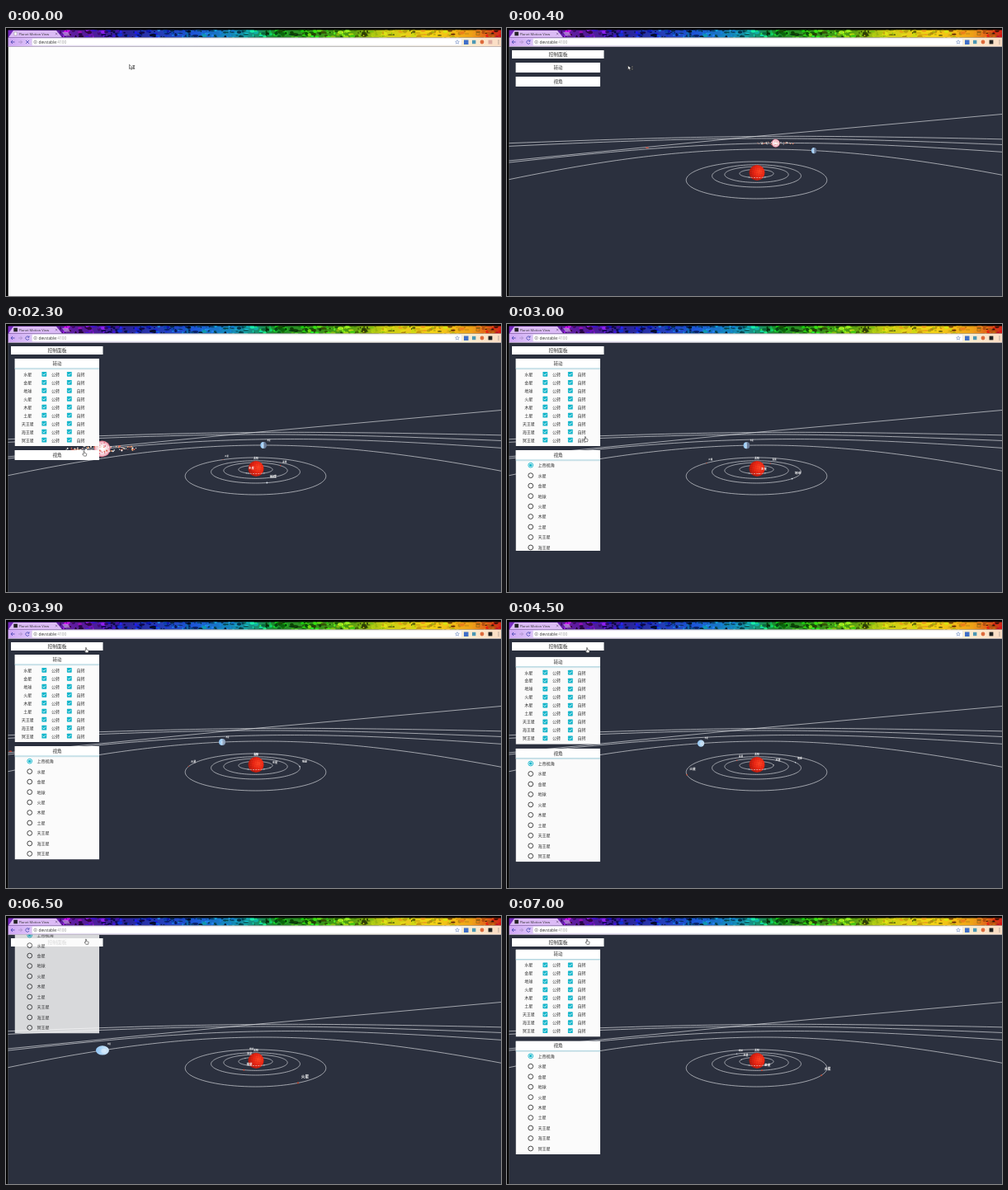
Write an HTML page that moves like this. It is 600x325 px and loops after 7.1 s.

```html
<!DOCTYPE html>
<html lang="zh">
<head>
<meta charset="utf-8">
<title>Planet Motion View</title>
<style>
html, body { margin: 0; width: 100%; height: 100%; overflow: hidden; background: #000; }
svg { display: block; width: 100vw; height: 100vh; }
text { font-family: "Noto Sans CJK SC", "Noto Sans CJK", sans-serif; fill: #333; }
.ui { font-family: "Open Sans", "Noto Sans", sans-serif; }
.tag { fill: #fff; font-weight: 700; text-anchor: middle; }
.mid { text-anchor: middle; }
.line { fill: none; stroke: #eceef0; stroke-width: .62; }
</style>
</head>
<body>
<svg id="stage" viewBox="0 0 600 325" preserveAspectRatio="none">
  <defs>
    <linearGradient id="paint">
      <stop offset="0" stop-color="#7a2cc0"/><stop offset=".15" stop-color="#5a1a9c"/>
      <stop offset=".24" stop-color="#2b2398"/><stop offset=".38" stop-color="#1c56d8"/>
      <stop offset=".47" stop-color="#1593b0"/><stop offset=".54" stop-color="#1c8a2c"/>
      <stop offset=".69" stop-color="#4a9a10"/><stop offset=".76" stop-color="#c8cc14"/>
      <stop offset=".86" stop-color="#f4d414"/><stop offset=".94" stop-color="#f0a018"/>
      <stop offset="1" stop-color="#d22418"/>
    </linearGradient>
    <linearGradient id="bar">
      <stop offset="0" stop-color="#cfa6f4"/><stop offset=".07" stop-color="#e3d2fa"/>
      <stop offset=".5" stop-color="#e2f0ea"/><stop offset=".92" stop-color="#fbf0d2"/>
      <stop offset="1" stop-color="#fbdcc4"/>
    </linearGradient>
    <linearGradient id="shade" x2="0" y2="1">
      <stop offset="0" stop-color="#8cc3d2"/><stop offset="1" stop-color="#dde8ec" stop-opacity="0"/>
    </linearGradient>
    <radialGradient id="sunFill" cx=".66" cy=".42" r=".7">
      <stop offset="0" stop-color="#ff4424"/><stop offset=".5" stop-color="#ea2412"/>
      <stop offset="1" stop-color="#a5150a"/>
    </radialGradient>
    <radialGradient id="pinkFill" cx=".5" cy=".5">
      <stop offset="0" stop-color="#fff"/><stop offset=".55" stop-color="#f6e3e8"/>
      <stop offset=".85" stop-color="#efb3c0"/><stop offset="1" stop-color="#d9627c"/>
    </radialGradient>
    <linearGradient id="blueFill">
      <stop offset="0" stop-color="#8fc2f2"/><stop offset=".5" stop-color="#b4daf8"/>
      <stop offset="1" stop-color="#d2e6f6"/>
    </linearGradient>
    <pattern id="mesh" width="2.6" height="2.6" patternUnits="userSpaceOnUse">
      <circle cx=".7" cy=".7" r=".5" fill="#8f1409"/><circle cx="2" cy="2" r=".35" fill="#ff6a44"/>
    </pattern>
    <clipPath id="page"><rect x="2.5" y="22.8" width="597.5" height="303"/></clipPath>
    <clipPath id="band"><rect x="2.5" y="2.5" width="597.5" height="9"/></clipPath>
  </defs>
  <rect width="600" height="325"/>
  <g id="chrome"></g>
  <g clip-path="url(#page)">
    <rect id="blank" x="2.5" y="22.8" width="598" height="303" fill="#fdfdfd"/>
    <g id="app">
      <rect x="2.5" y="22.8" width="598" height="303" fill="#2b303e"/>
      <g id="sky"></g>
      <g id="head"></g>
      <g id="panel"></g>
    </g>
  </g>
  <g id="pointer" fill="#fff" stroke="#111" stroke-width=".5" stroke-linejoin="round"></g>
</svg>
<script>
const LOOP = 7100, LOAD = 300;
const $ = id => document.getElementById(id);
const set = (node, attrs) => { for (const k in attrs) node.setAttribute(k, attrs[k]); return node; };
function add(parent, tag, attrs, text) {
  const node = set(document.createElementNS('http://www.w3.org/2000/svg', tag), attrs || {});
  if (text) node.textContent = text;
  return parent.appendChild(node);
}
const rect = (p, x, y, width, height, fill, more) => add(p, 'rect', { x, y, width, height, fill, ...more });
const path = (p, d, more) => add(p, 'path', { d, fill: 'none', ...more });
const label = (p, x, y, size, text, more) => add(p, 'text', { x, y, 'font-size': size, ...more }, text);
const show = (node, on) => set(node, { visibility: on ? 'visible' : 'hidden' });
const clamp = v => Math.max(0, Math.min(1, v));
const out = v => 1 - (1 - clamp(v)) ** 3;

let seed = 11;
const rnd = () => (seed = seed * 16807 % 2147483647) / 2147483647;

// Value at time t on a track; runs on past both ends.
function track(times, values, t) {
  let i = 1;
  while (i < times.length - 1 && t > times[i]) i++;
  const k = (t - times[i - 1]) / (times[i] - times[i - 1]);
  return values[i - 1] + (values[i] - values[i - 1]) * k;
}

// ---- browser window ----
const chrome = $('chrome');
const strip = add(chrome, 'g', { 'clip-path': 'url(#band)' });
rect(strip, 2, 2, 598, 10, 'url(#paint)');
for (let i = 0; i < 420; i++) {
  const x = 66 + rnd() * 534;
  const hue = track([66, 180, 280, 330, 430, 480, 550, 600], [285, 225, 190, 120, 80, 56, 42, 5], x);
  const dark = rnd() < (x > 440 ? .15 : .5);
  add(strip, 'ellipse', {
    cx: x, cy: 2 + rnd() * 10, rx: .6 + rnd() * 3, ry: .5 + rnd() * 1.8,
    fill: `hsl(${hue + rnd() * 36 - 18},85%,${dark ? 8 + rnd() * 16 : 36 + rnd() * 18}%)`
  });
}
path(strip, 'M3 11.5L9 3H61L68 11.5Z', { fill: '#dcbcf6' });
path(strip, 'M68 5H75L78 9.5H71Z', { fill: '#b98be0', opacity: .8 });
path(chrome, 'M59.8 5.8l2.6 2.6m0-2.6l-2.6 2.6', { stroke: '#5d4a70', 'stroke-width': .5 });
path(chrome, 'M556 7h5m9-1.5h4v3h-4zm16 0l3 3m0-3l-3 3', { stroke: '#6b5a1c', 'stroke-width': .6, opacity: .7 });
label(chrome, 15.5, 8.8, 4.1, 'Planet Motion View', { class: 'ui' });
const pageIcon = rect(chrome, 10, 5, 3, 4, '#fff', { stroke: '#777', 'stroke-width': .4 });
const siteIcon = rect(chrome, 9.3, 4.7, 4.6, 4.6, '#222');

rect(chrome, 2.5, 11.5, 597.5, 11.3, 'url(#bar)');
rect(chrome, 31.5, 12.8, 521, 8.4, '#fff', { rx: 1, stroke: '#d5cfdd', 'stroke-width': .4 });
rect(chrome, 2.5, 22.2, 597.5, .6, '#b9b5bd');
path(chrome, 'M10.5 17H6m2-2l-2 2l2 2', { stroke: '#4a4ab4', 'stroke-width': .9 });
path(chrome, 'M15 17h4.5m-2-2l2 2l-2 2', { stroke: '#a58fc4', 'stroke-width': .8 });
const stopIcon = path(chrome, 'M24 15l4 4m0-4l-4 4', { stroke: '#4a4ab4', 'stroke-width': .8 });
const reloadIcon = path(chrome, 'M27.6 15.6A2.2 2.2 0 1 0 28 18M28 14.4v1.8h-1.8', { stroke: '#4a4ab4', 'stroke-width': .8 });
add(chrome, 'circle', { cx: 35.5, cy: 17, r: 1.8, fill: 'none', stroke: '#666', 'stroke-width': .5 });
path(chrome, 'M35.5 16.6v1.4m0-2.2v.4', { stroke: '#666', 'stroke-width': .5 });
const url = label(chrome, 39.5, 18.7, 4.8, 'devstable', { class: 'ui' });
add(url, 'tspan', { fill: '#999' }, ':4100');
path(chrome, 'M547 14.6l.7 1.6 1.7.1-1.3 1.1.4 1.7-1.5-.9-1.5.9.4-1.7-1.3-1.1 1.7-.1z', { stroke: '#5a78b8', 'stroke-width': .5 });
rect(chrome, 555, 14.5, 5.5, 5.5, '#3f6fc8');
rect(chrome, 565, 14.8, 4.4, 4.4, '#4c98b4');
add(chrome, 'circle', { cx: 577, cy: 17, r: 2.4, fill: '#dd6a3c' });
const lastIcon = rect(chrome, 584.6, 14.6, 4.8, 4.8, '#222');
for (const y of [15, 17, 19]) add(chrome, 'circle', { cx: 597, cy: y, r: .55, fill: '#666' });

// ---- sky ----
const sky = $('sky');
const KEYS = [200, 1100, 2300, 3900, 5300, 6500, 7000];
const CX = 302.5, CY = 176;

// Point on a circular orbit seen in perspective; p is the nearness.
function orbit(a, deg, tilt = 0) {
  const r = deg * Math.PI / 180, p = 1 / (1 - a * .00477 * Math.sin(r));
  const dx = a * Math.cos(r) * p;
  return { x: CX + dx, y: CY + a * .2443 * Math.sin(r) * p + dx * tilt, p };
}
function ring(a, from, to, tilt, more) {
  let d = '';
  for (let g = from; g <= to; g += 2) {
    const o = orbit(a, g, tilt);
    d += (d ? 'L' : 'M') + o.x.toFixed(2) + ' ' + o.y.toFixed(2);
  }
  return path(sky, d, { class: 'line', ...more });
}

const BLUE = { a: 273, tilt: -.0083 }, PINK = { a: 496, tilt: -.021 };
for (const o of [BLUE, PINK, { a: 955, tilt: -.003 }, { a: 1390, tilt: -.008 }]) ring(o.a, 174, 366, o.tilt);
path(sky, 'M2 161Q301 130.2 600 104.5', { class: 'line' });

const inner = [
  { name: '水星', a: 20.5, color: '#bbb', deg: [212, 172, 120, 36, -53, -131, -158] },
  { name: '金星', a: 38, color: '#e0402a', deg: [48, 15, -30, -97, -186, -252, -278] },
  { name: '地球', a: 52.2, color: '#dfe8f2', deg: [148, 121, 78.5, 8, -47.5, -103, -123.5] },
  { name: '火星', a: 79, color: '#b8452e', deg: [288, 262, 230, 176, 116.6, 64.6, 42] }
];
inner.forEach(b => ring(b.a, 0, 360));

const speck = add(sky, 'ellipse', { rx: 2, ry: .6, fill: '#d8402e' });
const saturn = add(sky, 'g');
const grains = [];
add(saturn, 'circle', { r: 6.8, fill: 'url(#pinkFill)' });
for (let i = 0; i < 14; i++) {
  const g = rnd() * 6.28, d = 2 + rnd() * 4.2;
  add(saturn, 'circle', { cx: Math.cos(g) * d, cy: Math.sin(g) * d, r: .45, fill: '#e0607a' });
}
for (let i = 0; i < 84; i++) {
  const tint = ['#fff', '#f4e6d8', '#e9a070', '#e0604c'][i % 4];
  grains.push({ g: rnd() * 6.28, d: 17 + rnd() * 15, node: add(saturn, 'circle', { r: .35 + rnd() * .4, fill: tint }) });
}

const giant = add(sky, 'g');
add(giant, 'circle', { r: 1, fill: 'url(#blueFill)' });
add(giant, 'ellipse', { cx: .2, cy: .1, rx: .4, ry: .5, fill: '#f4f8fc', opacity: .4 });
const half = add(giant, 'path', { d: 'M.1 -1A1 1 0 0 1 .1 1Z', fill: '#4a5878' });
const giantTag = label(sky, 0, 0, 2, '木星', { class: 'tag' });

const SUN = { cx: 303, cy: 175.5 };
add(sky, 'circle', { ...SUN, r: 9.5, fill: 'url(#sunFill)' });
add(sky, 'circle', { ...SUN, r: 9.2, fill: 'url(#mesh)', opacity: .45 });
ring(20.5, 60, 120, 0, { 'stroke-dasharray': '2 1.2' });
const tags = add(sky, 'g');
label(tags, 302.8, 164, 2.9, '太阳', { class: 'tag' });
for (const b of inner) {
  b.dot = add(tags, 'circle', { fill: b.color });
  b.tag = label(tags, 0, 0, 3, b.name, { class: 'tag' });
}

function drawSky(t) {
  show(tags, t > 1500);
  for (const b of inner) {
    const o = orbit(b.a, track(KEYS, b.deg, t));
    set(b.dot, { cx: o.x, cy: o.y, r: .7 * o.p });
    set(b.tag, { x: o.x + 5.6 * o.p, y: o.y - 4.4 * o.p, 'font-size': 3.1 * o.p });
  }
  const s = orbit(PINK.a, -track([200, 1100, 2300, 3200, 7100], [74, 105.5, 147.8, 180, 184], t), PINK.tilt);
  const size = track([1100, 2300], [1, 1.45], t);
  set(saturn, { transform: `translate(${s.x} ${s.y}) rotate(${-2 * (size - 1)}) scale(${size})` });
  for (const q of grains) {
    const g = q.g - t * .0006;
    set(q.node, { cx: Math.cos(g) * q.d, cy: Math.sin(g) * q.d * .075 });
  }
  const o = orbit(BLUE.a, -track(KEYS, [55, 67, 85.4, 109.3, 137.6, 162.1, 170.7], t), BLUE.tilt);
  const w = track(KEYS, [3, 3.2, 3.6, 3.9, 4.6, 8, 9], t);
  const h = track(KEYS, [3.6, 3.8, 4, 4, 4.4, 5.7, 6.2], t);
  set(giant, { transform: `translate(${o.x} ${o.y}) scale(${w} ${h})` });
  set(half, { opacity: .75 * clamp((4600 - t) / 1200) });
  set(giantTag, { x: o.x + 5 + w * .4, y: o.y - h - 1.2 });
  show(giantTag, t > 1500);
  set(speck, { cx: 137 - (t - 1100) * .047, cy: 148 + (t - 1100) * .004 });
  set($('mesh'), { patternTransform: `translate(${t * .0012 % 2.6} 0) rotate(12)` });
}

// ---- control panel ----
const names = ['水星', '金星', '地球', '火星', '木星', '土星', '天王星', '海王星', '冥王星'];
rect($('head'), 6, 27, 111.5, 10, '#fff');
label($('head'), 62, 34.2, 5.8, '控制面板', { class: 'mid' });

const panel = $('panel');
function card(id, title, full) {
  const g = add(panel, 'g');
  const clip = rect(add(g, 'clipPath', { id }), 10.5, 0, 102.5, 12);
  const body = add(g, 'g', { 'clip-path': `url(#${id})` });
  rect(body, 10.5, 0, 102.5, full, '#fbfbfb');
  rect(body, 10.5, 0, 102.5, 12, '#fff');
  label(body, 62, 7.9, 5.5, title, { class: 'mid' });
  const edge = rect(body, 10.5, 11.6, 102.5, 2.4, 'url(#shade)');
  return { g, body, size(k) { set(clip, { height: 12 + (full - 12) * k }); show(edge, k > 0); } };
}
const spin = card('spin', '转动', 106), view = card('view', '视角', 137.5);
set(spin.g, { transform: 'translate(0 42)' });

names.forEach((name, i) => {
  const y = 18.8 + i * 9.98;
  label(spin.body, 26.3, y + 1.9, 5.1, name, { class: 'mid' });
  [[46.3, '公转'], [76.8, '自转']].forEach(([x, word]) => {
    rect(spin.body, x - 2.9, y - 2.9, 5.8, 5.8, '#14b6cb', { rx: .6 });
    path(spin.body, `M${x - 1.7} ${y}l1.2 1.3l2.3-2.5`, { stroke: '#fff', 'stroke-width': .8 });
    label(spin.body, x + 13.8, y + 1.9, 5.1, word, { class: 'mid' });
  });
});
['上帝视角', ...names].forEach((name, i) => {
  const y = 18.2 + i * 12.47, color = i ? '#333' : '#14b6cb';
  add(view.body, 'circle', { cx: 28.7, cy: y, r: 2.9, fill: '#fff', stroke: color, 'stroke-width': .9 });
  if (!i) add(view.body, 'circle', { cx: 28.7, cy: y, r: 1.7, fill: color });
  label(view.body, 37.4, y + 1.9, 5.1, name);
});

function bounce(stops, p) {
  const i = Math.max(1, stops.findIndex(s => p <= s[0]));
  const [a, from] = stops[i - 1], [b, to] = stops[i];
  return (from + (to - from) * out((p - a) / (b - a))) / 3.2;
}
const LEAVE = [[0, 0], [.2, -10], [.4, 20], [.45, 20], [1, -2000]];
const ENTER = [[0, -3000], [.6, 25], [.75, -10], [.9, 5], [1, 0]];
const HIDE = 4050, BACK = 6230;

function drawPanel(t) {
  const k = out((t - 840) / 750);
  spin.size(k);
  view.size(out((t - 2550) / 900));
  set(view.g, { transform: `translate(0 ${59 + 94 * k})` });
  let dy = 0, alpha = 1;
  if (t >= BACK) {
    const p = (t - BACK) / 1000;
    dy = bounce(ENTER, p);
    alpha = out(p / .6);
  } else if (t >= HIDE) {
    const p = clamp((t - HIDE) / 1000);
    dy = bounce(LEAVE, p);
    alpha = 1 - out((p - .45) / .55);
  }
  set(panel, { transform: `translate(0 ${dy})`, opacity: alpha });
}

// ---- pointer ----
const pointer = $('pointer');
const arrow = add(pointer, 'g'), hand = add(pointer, 'g');
path(arrow, 'M0 0V5.4L1.3 4.2L2.2 6.2L3.1 5.8L2.2 3.9H4Z', { fill: '#fff' });
const wait = path(arrow, 'M4.2 1.2h2.2l-2.2 4h2.2z', { fill: '#ddd' });
path(hand, 'M1.2 .3Q1.8-.3 2.3.4V2.6L4.6 3.2Q5 3.4 4.9 4L4.4 6.3H1.6L-.2 4Q0 3.2 1.2 4Z', { fill: '#fff' });
const MOVES = [0, 300, 1100, 1500, 2100, 2900, 3600, 5500, 6200, 7100];
const MX = [149.5, 149.5, 126.5, 126.5, 92.8, 92.8, 95.2, 95.2, 95.2, 95.2];
const MY = [44.3, 44.3, 53, 53, 153.8, 153.8, 33.3, 33.5, 28, 28];

function drawPointer(t) {
  const grab = t > 2050;
  show(arrow, !grab);
  show(hand, grab);
  set(wait, { opacity: t < 1300 ? 1 : 0 });
  set(pointer, { transform: `translate(${track(MOVES, MX, t)} ${track(MOVES, MY, t)})` });
}

function draw(t) {
  const ready = t >= LOAD;
  set($('app'), { display: ready ? 'inline' : 'none' });
  show(pageIcon, !ready);
  show(siteIcon, ready);
  show(stopIcon, !ready);
  show(reloadIcon, ready);
  set(lastIcon, { fill: ready ? '#222' : '#dcaaa0' });
  drawSky(t);
  drawPanel(t);
  drawPointer(t);
}
const start = performance.now();
function tick() {
  draw((performance.now() - start) % LOOP);
  requestAnimationFrame(tick);
}
tick();
</script>
</body>
</html>
```
